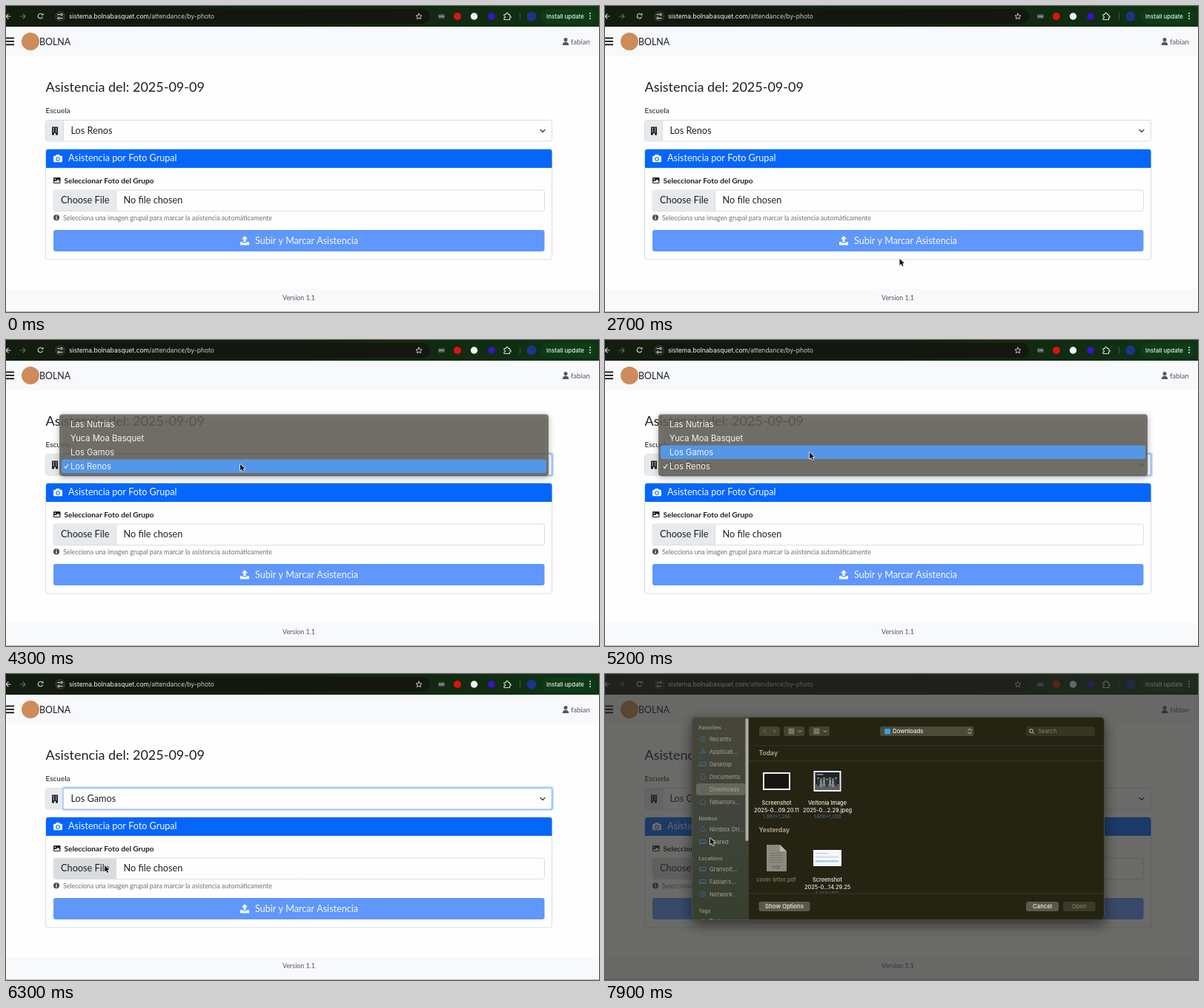
An HTML page with a canvas that plays this animation: 800x414 px, repeating every 8 s.

```html
<!DOCTYPE html>
<html lang="es">
<head>
<meta charset="utf-8">
<title>Asistencia</title>
<style>
  html, body { margin: 0; width: 100%; height: 100%; overflow: hidden; background: #fff; }
  canvas { display: block; width: 800px; height: 414px; }
</style>
</head>
<body>
<canvas id="stage"></canvas>
<script>
const W = 800, H = 414, LOOP = 8000, STEP = 100;
const canvas = document.getElementById('stage');
const ctx = canvas.getContext('2d');
const dpr = window.devicePixelRatio || 1;
canvas.width = W * dpr;
canvas.height = H * dpr;

const WEB = 'Lato, "Open Sans", sans-serif';
const SYS = 'Inter, Roboto, sans-serif';
const INK = '#1c1f22', LINE = '#d9dde0', CHIP = '#e7eaec', PAPER = '#fefefe', BAND = '#f8f9fb';

// Timeline of the interaction, in ms
const MENU_OPEN = 4100, MENU_CLOSE = 5600, BLUR = 6700, DIALOG = 7900;
const CURSOR = [
  [2400, 420, 390], [3400, 316, 168], [4300, 316, 168], [5000, 276, 152],
  [5600, 276, 152], [6200, 133, 259], [6900, 133, 259], [7600, 142, 222]
];

// ---------- drawing helpers ----------
function text(s, x, y, size, color, { font = WEB, weight = 400, align = 'left' } = {}) {
  ctx.font = `${weight} ${size}px ${font}`;
  ctx.textAlign = align;
  ctx.fillStyle = color;
  ctx.fillText(s, x, y);
}
const sys = (s, x, y, size, color, opt) => text(s, x, y, size, color, { font: SYS, ...opt });

function rect(x, y, w, h, color) {
  ctx.fillStyle = color;
  ctx.fillRect(x, y, w, h);
}
function box(x, y, w, h, r, fill, stroke, lw = 1) {
  ctx.beginPath();
  ctx.roundRect(x, y, w, h, r);
  if (fill) { ctx.fillStyle = fill; ctx.fill(); }
  if (stroke) { ctx.strokeStyle = stroke; ctx.lineWidth = lw; ctx.stroke(); }
}
function disc(x, y, r, color) {
  ctx.beginPath();
  ctx.arc(x, y, r, 0, Math.PI * 2);
  ctx.fillStyle = color;
  ctx.fill();
}
function ring(x, y, r, color, lw = 1, from = 0, to = Math.PI * 2) {
  ctx.beginPath();
  ctx.arc(x, y, r, from, to);
  ctx.strokeStyle = color;
  ctx.lineWidth = lw;
  ctx.stroke();
}
function shape(x, y, d, fill, stroke, lw = 1) {
  const p = new Path2D(d);
  ctx.save();
  ctx.translate(x, y);
  ctx.lineCap = ctx.lineJoin = 'round';
  if (stroke) { ctx.strokeStyle = stroke; ctx.lineWidth = lw; ctx.stroke(p); }
  if (fill) { ctx.fillStyle = fill; ctx.fill(p); }
  ctx.restore();
}
const line = (x, y, d, color, lw) => shape(x, y, d, null, color, lw);

function gradient(x, y, stops) {
  const g = ctx.createLinearGradient(0, 0, x, y);
  stops.forEach((c, i) => g.addColorStop(i / (stops.length - 1), c));
  return g;
}

// ---------- browser bar ----------
function browserBar() {
  rect(0, 0, W, 28, gradient(W, 0, ['#131d0f', '#12220f', '#0f3413']));
  line(0, 14, 'M6 0H0M3 -3L0 0L3 3', '#d4d8d0', 1.1);
  line(19, 14, 'M0 0H7M4 -3L7 0L4 3', '#646a60', 1.1);
  ring(46.5, 13.5, 3.2, '#d4d8d0', 1.1, 0.3, 5.4);
  shape(46.5, 13.5, 'M1 -1H4V-4Z', '#d4d8d0');

  box(63, 4, 509, 20, 10, '#14170f');
  disc(73, 14, 7.5, '#2a2e26');
  line(70, 11.5, 'M0 0H2.5M3 5H6', '#e0e3dc');
  ring(75, 11.5, 1.2, '#e0e3dc');
  ring(71, 16.5, 1.2, '#e0e3dc');
  sys('sistema.bolnabasquet.com', 85, 17, 8.53, '#f4f5f2');
  const host = ctx.measureText('sistema.bolnabasquet.com').width;
  sys('/attendance/by-photo', 85 + host, 17, 8.53, '#c8ccc4');
  line(557, 14, 'M0 -4L1.2 -1.3L4 -1L1.9 .9L2.5 3.7L0 2.2L-2.5 3.7L-1.9 .9L-4 -1L-1.2 -1.3Z', '#d4d8d0', .9);

  box(583, 11, 9, 6, 1.5, '#4d5258');
  box(722, 4, 75, 20, 10, '#0d3b16');
  for (let i = 0; i < 3; i++) {
    disc(585.2 + i * 2.3, 14, .7, '#fff');
    disc(788, 10 + i * 3.5, 1, '#e0e8de');
  }
  disc(609, 14, 5, '#e0130c');
  disc(631.5, 14, 4.7, '#f6f6f4');
  disc(655, 14, 4.6, '#3a12d4');
  line(672, 10.5, 'M0 1H2.5C2 -1.8 6 -1.8 5.5 1H7.5V3.2C9.8 2.8 9.8 6 7.5 5.6V8H0V5.8C2 5.8 2 3.2 0 3.2Z', '#d4d8d0', 1.1);
  rect(693, 9, 1, 10, '#3c5a3c');
  disc(709, 14, 6.5, '#1a358a');
  sys('Install update', 729, 16.8, 7.95, '#e6efe4', { weight: 500 });
}

// ---------- page ----------
function header() {
  rect(0, 28, W, 40, BAND);
  for (let i = 0; i < 3; i++) rect(0, 42.5 + i * 4.4, 11, 1.9, '#15171a');
  disc(33, 48, 12, '#cf8b5a');
  text('BOLNA', 45, 52.5, 12.4, INK);
  disc(755, 45.4, 2.5, '#54575a');
  shape(755, 53, 'M-4.3 0C-4.3 -6 4.3 -6 4.3 0Z', '#54575a');
  text('fabian', 762, 51.5, 9.6, '#54575a');
}

function schoolSelect(school, focused) {
  text('Escuela', 53.5, 145.3, 10, INK);
  if (focused) box(75, 152, 664, 33, 4, '#c2dafe');
  box(53.5, 154.5, 683, 28.5, 3, PAPER, LINE);
  box(54, 155, 23, 27.5, [3, 0, 0, 3], CHIP);
  rect(77, 155, 1, 27.5, LINE);
  if (focused) box(77, 154.5, 659.5, 28.5, 2, PAPER, '#86b7fe', 1.2);
  shape(62, 163.5, 'M0 0H8V11H5V8.5H3V11H0Z', INK);
  for (let i = 0; i < 6; i++) rect(63.5 + (i % 2) * 3.4, 165 + (i >> 1) * 2.2, 1.5, 1.2, CHIP);
  text(school, 87.5, 173.2, 12.7, INK);
  line(724, 169, 'M-3 -1.5L0 1.5L3 -1.5', '#343a40', 1.3);
}

function photoCard(hover) {
  const blue = '#0566fb';
  box(53.5, 193.5, 683, 149.5, 3, PAPER, LINE);
  box(54, 194, 682.5, 25, [3, 3, 0, 0], blue);
  shape(64, 201, 'M1.2 1.8H3L3.8 0H8L8.8 1.8H10.8Q12 1.8 12 3V9Q12 10.2 10.8 10.2H1.2Q0 10.2 0 9V3Q0 1.8 1.2 1.8Z', '#fbfcfe');
  ring(70, 207, 2.2, blue, 1.1);
  text('Asistencia por Foto Grupal', 84, 210.4, 12.6, '#f6f9fe');

  box(64, 232, 9.5, 8, 1, INK);
  disc(66.3, 234.3, .9, PAPER);
  shape(65, 239, 'M0 0V-1.3L1.5 -2.6L2.5 -1.8L5 -4.3L7.4 -2V0Z', PAPER);
  text('Seleccionar Foto del Grupo', 78.5, 239.6, 10.1, INK, { weight: 700 });

  box(64, 249, 662.5, 28.5, 3, PAPER, LINE);
  box(64.5, 249.5, 84, 27.5, [3, 0, 0, 3], hover ? '#d9dcdf' : CHIP);
  rect(148, 249.5, 1, 27.5, LINE);
  text('Choose File', 74, 267.4, 12.75, INK);
  text('No file chosen', 158.5, 267.4, 12.7, INK);

  disc(68, 286.3, 4, '#484c50');
  rect(67.4, 285.7, 1.3, 3, PAPER);
  rect(67.4, 283.6, 1.3, 1.2, PAPER);
  text('Selecciona una imagen grupal para marcar la asistencia automáticamente', 77, 289.5, 8.9, '#6c7074');

  box(64, 303, 662.5, 29, 3, '#5f97fc');
  shape(316, 311, 'M6 0L10 4.2H7.6V8.2H4.4V4.2H2ZM0 8.2H3.3V9.4H8.7V8.2H12V12.5H0Z', '#fbfcfe');
  text('Subir y Marcar Asistencia', 336, 322, 12.55, '#f6f9fe');
}

function page(t) {
  rect(0, 0, W, H, PAPER);
  browserBar();
  header();
  text('Asistencia del: 2025-09-09', 53.5, 115.5, 18, INK);
  schoolSelect(t < MENU_CLOSE ? 'Los Renos' : 'Los Gamos', t >= MENU_OPEN && t < BLUR);
  photoCard(t >= 6100);
  rect(0, 383, W, 31, BAND);
  text('Version 1.1', 395, 397.8, 8.9, '#54575a', { align: 'center' });
  rect(0, 413, W, 1, '#b6b8ba');
}

// ---------- school menu ----------
function menu(cursorY) {
  ctx.save();
  ctx.shadowColor = 'rgba(50,50,50,.45)';
  ctx.shadowBlur = 8 * dpr;
  ctx.shadowOffsetY = 2 * dpr;
  box(72, 100.5, 660, 83.5, 4, 'rgba(97,95,86,.82)');
  ctx.restore();
  const row = Math.max(0, Math.min(3, Math.floor((cursorY - 104.5) / 19)));
  box(75, 142.5 + (row - 2) * 19, 654, 18.5, 3, '#5496e8');
  ['Las Nutrias', 'Yuca Moa Basquet', 'Los Gamos', 'Los Renos'].forEach((s, i) =>
    sys(s, 87, 118 + i * 19, 11.2, '#f4f4ee'));
  line(79, 171, 'M0 .5L1.6 2.5L4.6 -2.5', '#f4f4ee', 1.2);
}

// ---------- file dialog ----------
const SIDEBAR = [
  ['Favorites', 73], ['Recents', 88, 'o'], ['Applicati…', 105, 'a'], ['Desktop', 122, 'r'],
  ['Documents', 139, 'd'], ['Downloads', 156, 'o'], ['fabianoru…', 173, 'h'],
  ['Nimbox', 196], ['Nimbox Dri…', 210, 'c'], ['Shared', 227, 'r'],
  ['Locations', 250], ['Granvolt…', 264, 'r'], ['Fabian’s…', 281, 'r'], ['Network', 298, 'o'],
  ['Tags', 321]
];
const ICONS = {
  o: 'M3.5 0A3.5 3.5 0 1 1 -3.5 0A3.5 3.5 0 1 1 3.5 0M0 -2V.5L1.5 1',
  a: 'M0 -3.5L-3 3M0 -3.5L3 3M-4 1H4',
  r: 'M-4 -2.5H4V2.5H-4ZM-4 1H4',
  d: 'M-2.5 -3.5H1L2.8 -1.5V3.5H-2.5Z',
  h: 'M-4 0L0 -3.5L4 0M-3 0V3.5H3V0',
  c: 'M-2.5 2.5C-5 2.5 -4.5 -.8 -2.4 -.6C-2 -4 2.2 -3.8 2.4 -.8C5 -.8 4.8 2.5 2.5 2.5Z'
};

function sidebar() {
  rect(117, 58, 77, 275, gradient(0, H, ['#45453a', '#45453a', '#40443a', '#384030', '#303a28']));
  box(123, 148, 66, 16, 3, '#66675a');
  for (const [name, y, icon] of SIDEBAR) {
    if (icon) {
      line(132, y, ICONS[icon], '#3a6a94', .9);
      sys(name, 141, y + 2.8, 7.7, '#a2a496');
    } else {
      sys(name, 126.5, y + 2.4, 6.8, '#93958a', { weight: 600 });
    }
  }
  disc(132, 334, 3, '#a83a20');
  sys('Red', 141, 337, 7.7, '#a2a496');
  box(189.5, 60, 4, 166, 2, '#adada6');
}

function dialogTools() {
  const pill = '#454330', mark = '#b5b4a2';
  box(208, 71, 28, 13, 3, pill);
  line(215.5, 77.5, 'M1 -2.5L-1.5 0L1 2.5', '#7c7b68');
  line(228.5, 77.5, 'M-1 -2.5L1.5 0L-1 2.5', '#7c7b68');
  for (const x of [241, 275]) {
    box(x, 71, 28, 13, 3, pill);
    line(x + 22, 77.5, 'M-2 -1L0 1L2 -1', mark);
    for (let i = 0; i < 4; i++)
      box(x + 7 + (i % 2) * 4, 74 + (i >> 1) * 4, 2.8, 2.8, .5, null, mark, .8);
  }
  box(371, 71, 126.5, 13, 3, '#4c4a38');
  box(377, 74, 8, 7.5, 1.5, '#31a4e0');
  sys('Downloads', 388, 80.4, 7.8, '#efeee4', { weight: 500 });
  line(492, 77.5, 'M-2 -1.3L0 -3.3L2 -1.3M-2 1.3L0 3.3L2 1.3', '#e2e1d4');
  box(568, 71, 93, 13, 3, '#37351f');
  ring(575, 77, 2.4, '#c8c7b8');
  line(577, 79, 'M0 0L2 2', '#c8c7b8');
  sys('Search', 584, 80.3, 7.7, '#827f6c');
}

function fileLabel(x, y, lines, dims, color = '#eeede0') {
  const opt = { align: 'center', weight: 500 };
  lines.forEach((s, i) => sys(s, x, y + 2.7 + i * 10, 7.35, color, opt));
  if (dims) sys(dims, x, y + 21, 6.4, '#46789c', { align: 'center' });
}

function groupPhoto(x, y) {
  rect(x, y, 37, 28, '#f2f2ee');
  rect(x + 2, y + 2, 33, 24, '#1f242c');
  rect(x + 2, y + 18, 33, 8, '#5c5f60');
  rect(x + 4, y + 4, 9, 2, '#75808a');
  for (let i = 0; i < 7; i++) {
    const px = x + 6 + i * 4, py = y + 10 + (i % 2) * 1.5;
    disc(px, py, 1.4, '#94806a');
    rect(px - 1.5, py + 1.5, 3, 9, i % 3 ? '#868a86' : '#2c3a44');
  }
}

function files() {
  const head = { weight: 600 };
  sys('Today', 207.5, 110, 8.6, '#b3b09c', head);
  rect(194, 117, 480, 1, '#353322');
  rect(213, 133, 37, 24, '#f2f2ee');
  rect(215, 135, 33, 20, '#16150e');
  fileLabel(231.5, 174, ['Screenshot', '2025-0…09.20.11'], '1,993×1,206');
  groupPhoto(281.5, 131);
  fileLabel(300, 174, ['Veltonia Image', '2025-0…2.29.jpeg'], '1,600×1,200');

  sys('Yesterday', 207.5, 214, 8.6, '#b3b09c', head);
  shape(218, 231, 'M0 0H18L27 9V36H0Z', '#8a8a80');
  shape(236, 231, 'M0 0L9 9H0Z', '#b8b8ae');
  for (let i = 0; i < 5; i++) rect(222, 242 + i * 3, 18, 1, '#74746a');
  sys('PDF', 231.5, 264, 6, '#62625a', { align: 'center', weight: 600 });
  fileLabel(231, 278, ['cover letter.pdf'], '', '#7e7c6c');
  rect(281, 238, 38, 22, '#f6f7f8');
  rect(284, 242, 17, 1.2, '#c4c8cc');
  rect(284, 246, 31, 3, '#e0e4e8');
  rect(284, 252, 31, 2.5, '#a6ccf4');
  ctx.save();
  ctx.beginPath();
  ctx.rect(194, 225, 480, 71.5);
  ctx.clip();
  fileLabel(300, 278, ['Screenshot', '2025-0…14.29.25'], '1,364×706');
  ctx.restore();
}

function button(s, x, w, fill, color) {
  box(x, 308, w, 13, 3, fill);
  sys(s, x + w / 2, 317.4, 7.8, color, { align: 'center', weight: 500 });
}

function dialog() {
  rect(0, 0, W, H, 'rgba(38,38,35,.68)');
  ctx.save();
  ctx.shadowColor = 'rgba(10,10,8,.6)';
  ctx.shadowBlur = 18 * dpr;
  ctx.shadowOffsetY = 6 * dpr;
  box(117, 58, 557, 275, 6, '#252312');
  ctx.restore();
  ctx.save();
  ctx.beginPath();
  ctx.roundRect(117, 58, 557, 275, 6);
  ctx.clip();
  rect(194, 96.5, 480, 1, '#343222');
  sidebar();
  dialogTools();
  files();
  rect(194, 296.5, 480, 1, '#3a3826');
  button('Show Options', 207.5, 69, '#5b5a4a', '#f0efe6');
  button('Cancel', 568, 44, '#5b5a4a', '#f0efe6');
  button('Open', 618, 43.5, '#3b3a28', '#7c7b6a');
  ctx.restore();
  box(117.5, 58.5, 556, 274, 6, null, '#55544a', .8);
}

// ---------- cursor ----------
function cursorAt(t) {
  if (t < CURSOR[0][0]) return null;
  let i = 0;
  while (i < CURSOR.length - 1 && t >= CURSOR[i + 1][0]) i++;
  const a = CURSOR[i], b = CURSOR[i + 1] || a;
  const k = b === a ? 0 : (t - a[0]) / (b[0] - a[0]);
  const e = k * k * (3 - 2 * k);
  return { x: a[1] + (b[1] - a[1]) * e, y: a[2] + (b[2] - a[2]) * e };
}
function pointer({ x, y }) {
  shape(x, y, 'M0 0V8.6L2 6.8L3.5 10L5 9.3L3.6 6.2L6.2 6Z', '#0a0a0a', '#fbfbfb', 1.5);
}

function draw(t) {
  ctx.setTransform(dpr, 0, 0, dpr, 0, 0);
  const cursor = cursorAt(t);
  page(t);
  if (t >= MENU_OPEN && t < MENU_CLOSE) menu(cursor.y);
  if (t >= DIALOG) dialog();
  if (cursor) pointer(cursor);
}

const start = performance.now();
function tick() {
  const t = (performance.now() - start) % LOOP;
  draw(Math.floor(t / STEP) * STEP);
  requestAnimationFrame(tick);
}
tick();
</script>
</body>
</html>
```
